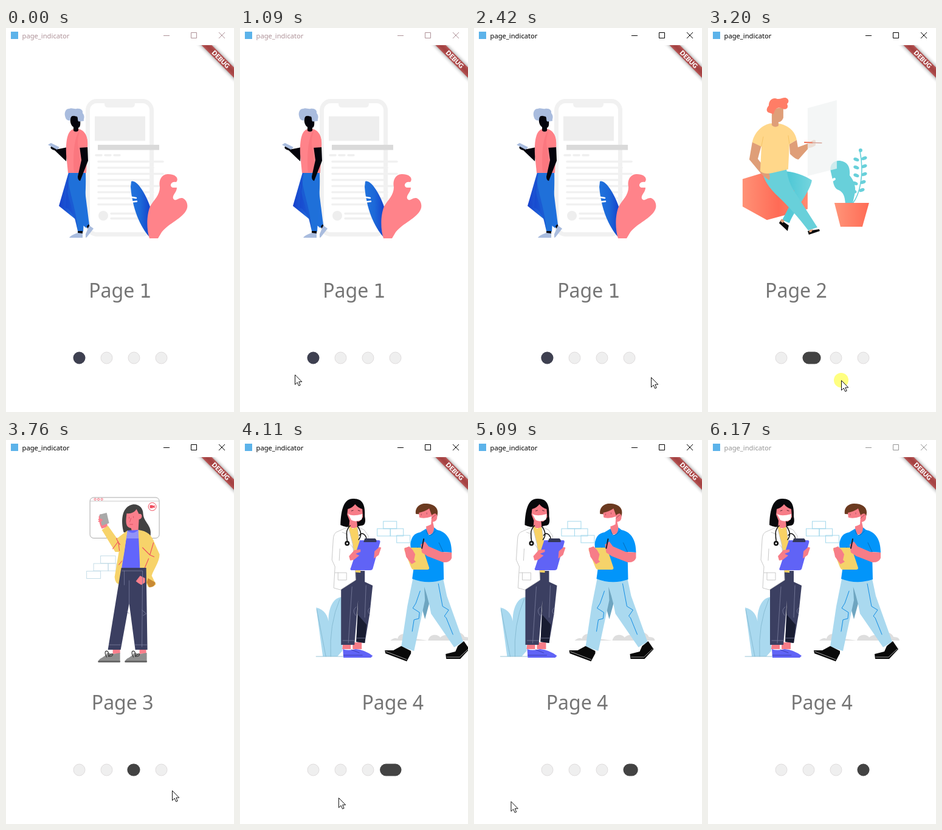
Animation of 375x628 px, one loop 6240 ms. Source, as an HTML page:

```html
<!DOCTYPE html>
<html lang="en">
<head>
<meta charset="utf-8">
<title>page_indicator</title>
<style>
html, body { margin: 0; width: 100%; height: 100%; overflow: hidden; background: #fff; }
svg { display: block; width: 375px; height: 628px; }
text { font-family: "Noto Sans", sans-serif; }
.page { font-size: 32px; fill: #757575; }
.foot { font-family: "DejaVu Sans", sans-serif; font-size: 31.5px; }
.debug { font: 900 10.4px Lato, sans-serif; fill: #fff; text-anchor: middle; }
</style>
</head>
<body>
<svg viewBox="0 0 375 628">
  <defs>
    <linearGradient id="blue"><stop stop-color="#2173dd"/><stop offset=".45" stop-color="#1c68d8"/><stop offset="1" stop-color="#133bc9"/></linearGradient>
    <linearGradient id="skirt"><stop stop-color="#1741cb"/><stop offset=".35" stop-color="#1d5cd6"/><stop offset=".5" stop-color="#1f70dc"/></linearGradient>
    <linearGradient id="coral"><stop stop-color="#ff9579"/><stop offset="1" stop-color="#ff6b55"/></linearGradient>
    <linearGradient id="seat"><stop stop-color="#ff9176"/><stop offset=".55" stop-color="#ff6b56"/><stop offset="1" stop-color="#ff8a70"/></linearGradient>
    <linearGradient id="teal"><stop stop-color="#72d4dd"/><stop offset=".5" stop-color="#50c8d6"/><stop offset="1" stop-color="#75d5de"/></linearGradient>
    <clipPath id="body"><rect y="28" width="375" height="600"/></clipPath>
    <filter id="blur" x="-20%" y="-100%" width="140%" height="300%"><feGaussianBlur stdDeviation="3"/></filter>
  </defs>
  <g id="pages"></g>
  <g id="dots"></g>
  <rect id="worm" y="529.5" height="20" rx="10"/>
  <g clip-path="url(#body)">
    <g transform="translate(376.5 26.5) rotate(45)">
      <rect x="-45" y="28" width="90" height="12" fill="#000" opacity=".5" filter="url(#blur)"/>
      <rect x="-45" y="28" width="90" height="12" fill="#b71c1c" opacity=".63"/>
      <text class="debug" x="1" y="37.7">DEBUG</text>
    </g>
  </g>
  <rect x="8" y="6" width="12" height="12" fill="#5cb3ea"/>
  <text id="title" x="26.5" y="17" font-size="11.2">page_indicator</text>
  <path id="controls" d="M259 12.5h10M304.5 7.5h9v9h-9zM350 7l10 10M360 7l-10 10" fill="none"/>
  <g id="cursor">
    <circle id="press" r="12" fill="#ffff80"/>
    <path d="M.5.5V16.5L4.2 13 6.7 18.5 9.2 17.4 6.8 12H11.8Z" fill="#fff" stroke="#111"/>
  </g>
</svg>
<script>
const $ = id => document.getElementById(id);
const shape = (d, fill, extra = '') => `<path d="${d}" fill="${fill}" ${extra}/>`;
const line = (d, color, width = 1) =>
  `<path d="${d}" fill="none" stroke="${color}" stroke-width="${width}" stroke-linecap="round" stroke-linejoin="round"/>`;
const box = (x, y, w, h, fill, extra = '') =>
  `<rect x="${x}" y="${y}" width="${w}" height="${h}" fill="${fill}" ${extra}/>`;
const disc = (x, y, r, fill, extra = '') => `<circle cx="${x}" cy="${y}" r="${r}" fill="${fill}" ${extra}/>`;

const bricks = (list, color) => list.map(([x, y, w]) => box(x, y, w, 12, 'none', `stroke="${color}"`)).join('');

function phoneReader() {
  const rows = [259, 243, 259, 239, 259, 243, 239, 232];
  return [
    box(134.5, 119.5, 105, 218, '#fff', 'rx="15" stroke="#f1f1f1" stroke-width="7"'),
    shape('M162 122H212V124Q212 130 206 130H168Q162 130 162 124Z', '#f1f1f1'),
    box(146, 144.5, 83, 40, '#eee'),
    box(151, 191, 101, 8.5, '#dadada'),
    line('M148 208h9M163 208h9M178 208h9', '#efefef', 3.5),
    rows.map((end, i) => line(`M152 ${218.5 + i * 10}H${end - 1}`, '#f1f1f1', 3.5)).join(''),
    disc(160, 307, 8, '#eee'),
    line('M173 303.5H222M173 311.5H222', '#f0f0f0', 3.5),
    // leaves
    shape('M206 251C216 246 235 280 239 300L241 343H237C220 325 208 295 205 260Z', 'url(#blue)'),
    line('M205 276.5L214 278M206 284.5L215 283.5', '#fff', 2.4),
    shape('M236 344C231 330 231 306 237 292C243 281 253 274 253 260C250 246 259 238 267 239C279 239 285 246 280 252C271 250 268 259 274 261L281 261C281 269 273 273 275 279C279 285 283 277 290 278C298 281 300 291 297 297C291 311 268 319 256 334L250 344Z', '#ff838a'),
    // legs and shoes
    shape('M103 236H126L137 322L132 327L87 291Z', 'url(#skirt)'),
    shape('M105 236H131C132 265 129 300 127 333L118 332C112 300 104 285 101 268Z', '#1f70d9'),
    shape('M101 245C106 275 116 300 118 331L113 312C107 300 103 295 98 294Z', '#1642cb', 'opacity=".45"'),
    shape('M118 332H126L126 337H118ZM133 324L136 321L138 324L134 328Z', '#05050f'),
    shape('M118 335L126 336V343H104Q106 339 118 335ZM137 323L144 328L133 342L131 343L131 337Z', '#a9bcde'),
    // torso and arms
    shape('M101 195L99 218L80 200C72 198 72 194 76 193L86 198Z', '#04040c'),
    shape('M69 191L74 188L88 195L84 199Z', '#a9bcde'),
    shape('M112 165C101 167 98 184 99 207L102 237H132L134 190C134 173 126 166 119 165Z', '#ff838a'),
    shape('M121 168C111 178 110 216 112 236H124L119 196Z', '#f3636c', 'opacity=".35"'),
    shape('M121 194L134 193L135 217L122 250Q118 249 118 243L124 216Z', '#04040c'),
    shape('M119 196C116 183 120 169 124 168C133 171 135 184 134 195Z', '#ff8086'),
    // head
    shape('M106 144L119 142L122 151C123 160 121 163 119 163L119 168Q115 171 111 168V162C106 159 105 152 106 144Z', '#04040c'),
    shape('M98 147C95 140 97 132 104 132C108 130 112 133 116 132C123 131 127 135 126 139C131 145 127 149 128 152L120 153C117 152 119 148 117 145C111 143 106 142 106 151C102 152 99 150 98 147Z', '#a9bcde')
  ].join('');
}

function painter() {
  const skin = '#df9e78', hue = '#68d0da';
  let vine = line('M238 287C249 273 258 241 250 201', hue, 1.6);
  for (let i = 0; i < 5; i++) {
    const y = 215 + i * 13, x = 251 - Math.max(0, i - 2) * 2;
    vine += `<g fill="${hue}"><ellipse cx="${x - 7}" cy="${y}" rx="4.8" ry="2.8" transform="rotate(22 ${x - 7} ${y})"/>` +
      `<ellipse cx="${x + 6}" cy="${y - 2}" rx="4.8" ry="2.8" transform="rotate(-22 ${x + 6} ${y - 2})"/></g>`;
  }
  return [
    shape('M57 247L100 234L164 262V296L97 314L57 292Z', 'url(#seat)'),
    shape('M95 238C125 228 155 238 171 249C168 268 142 298 134 319L122 314C130 300 139 283 142 266L110 254Z', 'url(#teal)'),
    shape('M90 236L129 230C131 243 134 255 142 267L180 326L165 331C150 311 130 289 117 277C102 263 92 250 90 236Z', hue),
    shape('M120 314L133 323L131 332L117 319ZM164 332L183 329L184 332L166 338Z', '#0a0a0a'),
    shape('M121 312L126 315L123 319L119 316ZM168 330L173 329L170 334L166 334Z', skin),
    shape('M73 186L88 192L82 214L97 233Q104 240 101 249L95 245L88 239L68 215Z', skin),
    shape('M146 183L148 195L167 188Q174 181 177 184V192Q171 196 166 196L149 215Q144 215 135 206L134 190Z', skin),
    shape('M104 156C91 157 76 170 73 187L88 194L86 234Q92 240 106 237L132 231L134 190L146 183C144 170 133 159 116 156Z', '#ffd78a'),
    line('M88 193L91 178M134 189L132 176', '#f6c466', 1),
    shape('M108 132L124 130L124 147Q121 154 116 154L116 160Q110 164 105 159V140Z', skin),
    shape('M99 138C95 135 97 130 100 127C100 117 108 113 114 116C121 117 126 111 131 116C134 119 132 123 130 124C134 132 127 135 121 131C113 129 110 132 108 141Z', '#ff7d66'),
    shape('M202 235C199 223 208 216 217 217C232 219 234 230 233 241C241 250 243 260 242 269L238 287H226C225 275 223 269 215 265C209 263 207 257 206 252Z', hue),
    line('M203 250L208 247', '#fff', 4),
    shape('M164 131L212 118V230L164 242Z', '#f1f4f4', 'opacity=".76"'),
    line('M159 187L172 187.5', '#ef7155', 2), line('M172 187.5L187 188', '#d7a59a', 1.5),
    vine, disc(251, 200, 3, hue),
    shape('M208 286H265L254 325H218Z', 'url(#coral)')
  ].join('');
}

function caller() {
  const red = '#ef4c5d', pink = '#fb7f8c', denim = '#3b3f61', gold = '#f7d36a';
  const shoe = x =>
    shape(`M${x} 364C${x} 356 ${x + 10} 357 ${x + 15} 348L${x + 25} 350L${x + 36} 348V364Z`, '#8f8f8f') +
    line(`M${x} 362H${x + 36}M${x + 14} 355C${x + 6} 342 ${x + 20} 342 ${x + 17} 354C${x + 26} 344 ${x + 27} 355 ${x + 17} 354`, '#333', 1.1);
  return [
    bricks([[155, 189.5, 24.5], [143.5, 202, 24], [167.5, 202, 13], [132, 214.5, 23]], '#c5dde8'),
    box(137.5, 94, 114, 66.5, '#fff', 'rx="6" stroke="#a9a9a9"'),
    line('M138 100H251', '#bbb', .8),
    [146, 151.5, 157].map(x => disc(x, 97, 1.6, 'none', `stroke="${red}" stroke-width=".8"`)).join(''),
    disc(240, 109, 6.5, '#fff', `stroke="${red}"`),
    shape('M236 106.5H241V108L244 106.5V111.5L241 110V111.5H236Z', red),
    shape('M193 151C188 132 190 113 203 107C214 102 225 109 225 121C226 135 240 139 237 157L216 153Z', '#424242'),
    shape('M198 120C205 121 211 118 214 113L218 121C224 119 225 129 218 130L217 147L207 151L205 144C196 143 196 134 198 120Z', pink),
    line('M202 126V128M209 125V127M205 128L203 134M203 138H208', '#d94d61', .9),
    shape('M199 148L218 147L222 173L220 209H189L194 180Z', '#6265fb'),
    shape('M199 148Q208 156 217 147L218 161H197Z', '#9192f9'),
    shape('M152 125L155 121L166 136L166 142L157 145Q152 137 152 125Z', pink),
    shape('M153 122L165 119L169 136L157 140Z', '#a9a9a9'),
    line('M152 130H157M152 133L157 132', pink, 2),
    shape('M157 147L167 140L182 161L199 148L194 183L190 207L188 236Q179 237 178 224L185 183L179 183Z', gold),
    shape('M217 147C232 149 239 155 244 169L252 187C252 199 242 212 239 222L246 236Q240 242 233 240L220 213Z', gold),
    shape('M233 226L245 233Q245 240 235 241L231 233Z', '#c98a34'),
    line('M181 161Q184 168 187 171M175 178L184 166L186 181M224 176L236 188L243 191M234 194L223 220M242 168L236 188M190 198L185 204', red, 1.1),
    shape('M189 209H230L232 343H212L202 267L188 343H167Z', denim),
    shape('M213 231L220 222L228 226L228 233L222 237L217 234Z', pink),
    line('M194 214V237M190 214H224L223 338M202 268V230M169 335H188M212 335H231M198 280L202 284M223 278L230 284L225 287', '#7b7f9f', .8),
    shape('M175 343H187V349L175 350ZM219 343H230V349L219 350Z', pink),
    shoe(151), shoe(195)
  ].join('');
}

function doctors() {
  const pink = '#f77d88', denim = '#3b3f61', sky = '#aad9ef', edge = '#c9c9c9';
  return [
    bricks([[171.5, 133, 22], [161.5, 145, 21.5], [183, 145, 21.5], [193.5, 156, 22]], '#a3d8ec'),
    shape('M183 328Q190 322 195 325C197 315 212 315 215 324L245 328C248 315 263 318 265 323C273 315 282 321 283 323C289 307 304 317 305 322Q315 322 315 328Z', '#dedede'),
    shape('M61 274C75 277 81 288 82 301C79 282 87 256 104 257V345L96 354H72Z', sky),
    line('M62 277L77 354M100 260Q82 302 85 354M61 354H108', '#7fb5cd', .8),
    // doctor
    shape('M104 342H118V333H105ZM121 342H136V331H121Z', pink),
    shape('M102 240L126 214H141V232L154 238L149 285L141 332L127 330L130 262L124 335H102Z', denim),
    shape('M131 262L129 285L144 302L141 332L127 330Z', '#181c31'),
    line('M105 328H124M127 324H142M120 240L114 332M143 238L141 290M127 273Q119 278 126 287M150 274Q143 279 149 285', '#7b7f9f', .8),
    shape('M105 342Q113 345 126 342Q141 343 154 353L151 356H106Z', '#6063f6'),
    line('M106 352H137M119 343L132 348', '#383cae', .9),
    shape('M101 139C102 112 107 95 123 96C138 96 142 107 141 125Q144 140 135 140L121 143Q109 143 101 139Z', '#08080b'),
    shape('M112 122L113 113Q122 110 125 105Q130 111 137 113L138 126Q131 137 128 132L129 144L115 144L116 132Z', pink),
    shape('M113 120Q119 126 137 121L136 130Q127 135 119 131Z', '#fff'),
    line('M119 116L122 115M130 115L133 116', '#4d202b', .9),
    shape('M115 140L121 145L129 142L134 158L134 217L121 216Z', '#f9d264'),
    shape('M114 142L98 149Q89 151 89 164L87 196L92 207L90 242L101 245L126 229L125 205L121 170ZM129 142L140 147L147 157L146 166L132 165Z', '#fff', `stroke="${edge}"`),
    line('M100 178L99 197M92 217H111V229H97V217M104 151L113 154L110 160L124 180', edge),
    line('M117 140C108 149 112 157 112 165M129 141C135 149 136 157 131 163M132 156C136 150 144 154 144 165', '#111', 1.5),
    disc(112, 169, 4, '#111'), disc(112, 169, 1.5, '#fff'),
    shape('M133 164L165 164Q167 165 166 168L154 211Q153 213 150 213H119Q116 212 118 209Z', '#6063f6'),
    shape('M141 161H158Q161 163 160 167H139Z', '#343858'),
    shape('M115 190L124 180L134 179L134 183L126 186L132 189L123 196L117 197ZM157 182L165 175L168 176L164 188L156 194Z', pink),
    // colleague
    shape('M225 121C223 111 231 104 240 104C256 104 264 112 260 125L255 133L246 122Z', '#6b3a20'),
    shape('M230 119Q240 117 247 112L251 123Q258 117 260 124Q261 133 253 134L257 153L242 155L242 140Q233 140 231 129Z', pink),
    shape('M229 126Q238 130 251 125L250 138Q239 144 232 140Z', '#fff'),
    line('M251 128L258 122M234 121V123M243 119V121', '#a5505e', .9),
    shape('M236 224L249 260L240 293L227 246Z', '#6ea5c0'),
    shape('M220 227H238L240 262L222 345L201 338L211 272ZM237 227H270L276 255L303 330L288 339L250 284Q246 260 237 235Z', sky),
    line('M232 247L225 267L220 275L231 282L230 292L222 294L219 313M262 235L269 272L279 278L272 288L275 291L286 318', '#138de4', 1),
    shape('M242 145L232 151Q218 153 216 170L217 184L225 183L219 227Q245 237 271 228L270 183L284 184C284 162 275 150 260 147L255 143Q255 154 246 156Z', '#0295fa'),
    line('M242 148Q246 163 257 149M270 183L263 168M225 183L228 175', '#0567b3', .9),
    shape('M207 176H233Q236 177 237 179L247 209Q247 212 244 212H221Q218 211 217 208L206 180Z', '#f5d36a'),
    shape('M206 177L214 174L220 180L224 187L222 196L225 199L218 203L209 191Z', pink),
    shape('M233 171L240 166L246 174L267 183L284 184V193Q281 201 270 200L244 190L235 184Z', pink),
    line('M238 162L235 177', '#1e1e2c', 2),
    shape('M201 337L217 345L217 349L210 362L175 349L174 344L188 344ZM274 350L290 346L294 337L304 329L313 342L298 358H275Z', '#090909'),
    line('M176 346L210 359M276 355L297 355L311 342', '#e2e2e2', .7)
  ].join('');
}

// Each drawing with the horizontal shift that centres it on its page.
const WIDTH = 375;
const PAGES = [[phoneReader, 0], [painter, 42], [caller, -4], [doctors, 0]];
$('pages').innerHTML = PAGES.map(([draw, dx], i) =>
  `<g transform="translate(${i * WIDTH})"><g transform="translate(${dx})">${draw()}</g>` +
  `<text class="page" x="136.2" y="441">Page ${i ? i + 1 : '<tspan class="foot">1</tspan>'}</text></g>`).join('');
$('dots').innerHTML = PAGES.map((_, i) =>
  disc(120.5 + i * 45, 539.5, 9.5, '#efefef', 'stroke="#dfdcdd"')).join('');

const LOOP = 6240, TICK = 70, FIRST_MOVE = 460;
const smooth = u => u * u * (3 - 2 * u);

// [time, x, y, easing towards it]
const POINTER = [
  [460, 306, 581], [1020, 90, 568, smooth], [1120, 90, 566], [1720, 343, 562, smooth],
  [1860, 348, 563], [2420, 291, 571, smooth], [2460, 291, 571], [2640, 140, 585],
  [3060, 265, 578, smooth], [3120, 265, 578], [3190, 219, 576], [3300, 100, 588],
  [3750, 273, 573, smooth], [3780, 273, 573], [3940, 112, 589], [4380, 278, 575, smooth],
  [4450, 278, 574], [4520, 233, 573], [4690, 125, 578], [4870, 110, 580], [5320, 0, 604, smooth]
];
// [press, release, page it snaps to]
const DRAGS = [[1120, 1860, 0], [2460, 2630, 1], [3120, 3290, 2], [3780, 3930, 3], [4450, 4870, 3]];

function pointer(t) {
  const next = POINTER.findIndex(k => k[0] > t);
  const last = next < 0 ? POINTER.length - 1 : next;
  const [t0, x0, y0] = POINTER[Math.max(0, last - 1)], [t1, x1, y1, ease] = POINTER[last];
  const part = Math.min(1, Math.max(0, (t - t0) / (t1 - t0 || 1)));
  const u = ease ? ease(part) : part;
  return [x0 + (x1 - x0) * u, y0 + (y1 - y0) * u];
}

// Dragging past either end meets growing resistance.
const resist = d => WIDTH * (1 - 1 / (1 + .52 * d / WIDTH));
function soften(x) {
  const end = (PAGES.length - 1) * WIDTH;
  return x < 0 ? -resist(-x) : x > end ? end + resist(x - end) : x;
}

// Gap left by an overdamped spring after s seconds.
function springGap(gap, speed, s) {
  const slow = 9.07, fast = 22.04;
  const a = (fast * gap - speed) / (fast - slow);
  return a * Math.exp(-slow * s) + (gap - a) * Math.exp(-fast * s);
}

function scrollAt(t) {
  let rest = () => 0;
  for (const [press, release, page] of DRAGS) {
    if (t < press) break;
    const from = rest(press), grab = pointer(press)[0];
    const dragged = u => soften(from + grab - pointer(u)[0]);
    if (t < release) return dragged(t);
    const held = dragged(release), speed = (held - dragged(release - 10)) / .01;
    const goal = page * WIDTH;
    rest = u => goal - springGap(goal - held, speed, (u - release) / 1000);
  }
  return rest(t);
}

function wormSpan(pos) {
  if (pos < 0) return [pos * 63, 0];
  const i = Math.floor(pos), f = pos - i;
  return [(i + Math.max(0, 2 * f - 1)) * 45, (i + Math.min(1, 2 * f)) * 45];
}

function render(now) {
  const time = now % LOOP;
  const t = time < FIRST_MOVE ? 0 : FIRST_MOVE + Math.floor((time - FIRST_MOVE) / TICK + .1) * TICK;
  const scroll = scrollAt(t);
  $('pages').setAttribute('transform', `translate(${-scroll})`);

  const [left, right] = wormSpan(scroll / WIDTH);
  $('worm').setAttribute('x', 110.5 + left);
  $('worm').setAttribute('width', 20 + right - left);
  $('worm').setAttribute('fill', scroll < 280 ? '#3e4050' : '#434343');

  const ink = time >= 6170 ? '#969696' : t < 1120 ? '#ae9298' : '#000';
  $('title').setAttribute('fill', ink);
  $('controls').setAttribute('stroke', ink);

  $('cursor').style.display = t >= FIRST_MOVE && t < 5320 ? '' : 'none';
  $('cursor').setAttribute('transform', `translate(${pointer(t)})`);
  $('press').style.display = DRAGS.some(([a, b]) => t >= a && t < b) ? '' : 'none';
}

const start = performance.now();
function loop() {
  render(performance.now() - start);
  requestAnimationFrame(loop);
}
loop();
</script>
</body>
</html>
```
